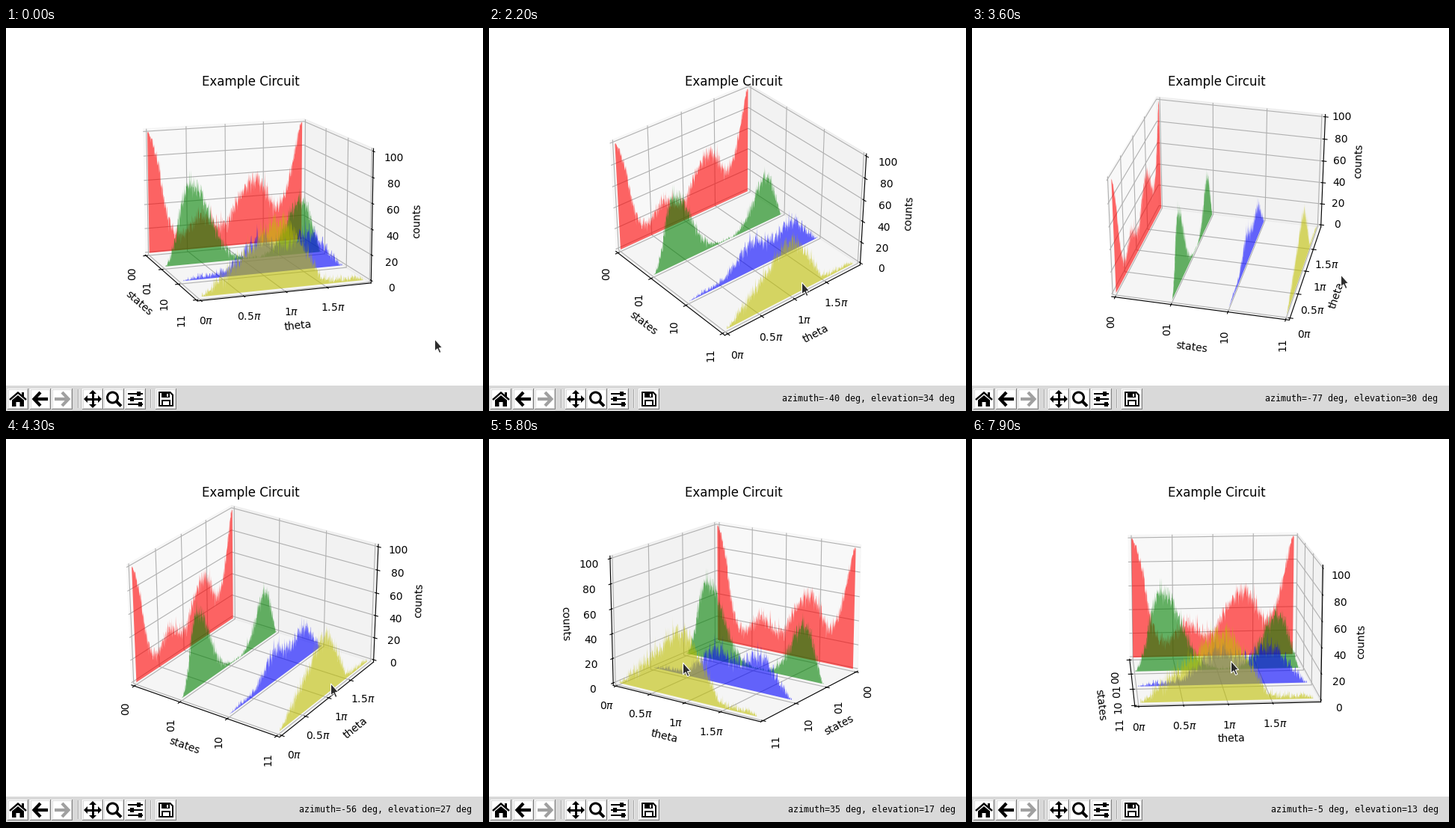
Recreate the animation shown at these times as a matplotlib script. Size 638 by 512 pixels, loop 8000 ms.

```python
import numpy as np
import matplotlib.pyplot as plt
from matplotlib.animation import FuncAnimation
from matplotlib.collections import PolyCollection
from matplotlib.patches import Circle, Polygon, Rectangle

W, H, DPI = 638, 512, 100
FRAMES, INTERVAL = 80, 100
PX = 72 / DPI
DRAG_START = 12


def smooth(t, xs, ys):
    """Monotone cubic interpolation: flat at peaks and over holds."""
    xs, ys = np.asarray(xs, float), np.asarray(ys, float)
    h = np.diff(xs)
    d = np.diff(ys) / h
    a, b = d[:-1], d[1:]
    m = np.zeros_like(ys)
    m[1:-1] = [2 * p * q / (p + q) if p * q > 0 else 0 for p, q in zip(a, b)]
    t = np.clip(t, xs[0], xs[-1])
    k = np.clip(np.searchsorted(xs, t, "right") - 1, 0, len(xs) - 2)
    u = (t - xs[k]) / h[k]
    return ((1 + 2 * u) * (1 - u) ** 2 * ys[k] + u * (1 - u) ** 2 * h[k] * m[k]
            + u * u * (3 - 2 * u) * ys[k + 1] + u * u * (u - 1) * h[k] * m[k + 1])


# Mean counts of each state at every 0.1 pi
MEANS = {
    "00": [100, 79, 42, 18, 13, 18, 25, 28, 23, 18, 21,
           32, 45, 53, 55, 47, 34, 30, 46, 75, 100],
    "01": [0, 14, 43, 62, 62, 49, 33, 18, 8, 3, 1,
           0.6, 1, 4, 10, 22, 36, 46, 40, 18, 0],
    "10": [0, 1, 2, 2.5, 3, 5, 9, 15, 22, 27, 27,
           24, 21, 22, 26, 30, 29, 23, 13, 5, 0],
    "11": [0, 4, 10, 15, 22, 29, 36, 42, 48, 52, 51,
           46, 34, 24, 11, 4, 2.5, 3, 3, 2, 0],
}
COLORS = ["r", "g", "b", "y"]

# frame, azimuth, elevation
VIEW = np.array([
    (0, -20, 13), (12, -20, 13), (16, -27, 18), (20, -38, 27), (22, -39.6, 34),
    (23, -40.5, 35), (26, -50, 36), (29, -63, 35), (30, -67, 34.5),
    (33, -75, 32), (37, -77, 30), (39, -77, 30), (42, -64, 27.2),
    (43, -56, 27), (44, -48, 28.6), (51, -2, 28), (52, 6, 27.4),
    (56, 30, 20), (64, 43, 10), (67, 43, 10), (71, 31, 9),
    (75, 9, 10), (79, -5, 13), (80, -5.3, 13.8),
])


def view(i):
    return (smooth(i, VIEW[:, 0], VIEW[:, 1]),
            smooth(i, VIEW[:, 0], VIEW[:, 2]))


def mouse_for(azim, elev):
    """Pointer position that drags the plot to this view."""
    deg_per_px = 180 / 369.6
    return np.array([247 + (43 - azim) / deg_per_px,
                     288 + (elev - 10) / deg_per_px])


def pointer(i):
    if i == 0:
        return np.array([573, 415])
    start = np.array([567, 415])
    if i < 8:
        u = max(0, i - 2) / 6
        u = u * u * (3 - 2 * u)
        return start + u * (mouse_for(-20, 13) - start)
    return mouse_for(*view(i + 1))


def status(i):
    if i < 5:
        return ""
    if i < DRAG_START:
        return f"x=, y=, z={(415 - pointer(i)[1]) * 0.2:.1f}"
    azim, elev = (int(round(float(v))) for v in view(i))
    return f"azimuth={azim} deg, elevation={elev} deg"


fig = plt.figure(figsize=(W / DPI, H / DPI), dpi=DPI, facecolor="white")

# 3D plot
ax = fig.add_axes([79 / W, 86.8 / H, 496 / W, 369.6 / H], projection="3d")
theta = np.arange(0, 2 * np.pi, 0.01)
means = np.array([smooth(theta, np.linspace(0, 2 * np.pi, 21), m)
                  for m in MEANS.values()])
probs = (means / means.sum(axis=0)).T
rng = np.random.default_rng(4)
counts = np.array([rng.multinomial(100, p) for p in probs]).T
verts = [[(theta[0], 0), *zip(theta, c), (theta[-1], 0)] for c in counts]
polys = PolyCollection(verts, facecolors=COLORS, linewidths=0, alpha=0.6)
ax.add_collection3d(polys, zs=range(4), zdir="x")

ax.set_xticks(range(4), list(MEANS), rotation=90)
ax.set_yticks(np.arange(4) * np.pi / 2,
              [rf"{n}$\pi$" for n in ("0", "0.5", "1", "1.5")])
ax.set_zticks(range(0, 101, 20))
for set_lim, top in ((ax.set_xlim, 3), (ax.set_ylim, 2 * np.pi), (ax.set_zlim, 100)):
    set_lim(-top / 48, top * 49 / 48)
ax.set_xlabel("states")
ax.set_ylabel("theta")
ax.set_zlabel("counts")
ax.set_title("Example Circuit", y=1)

# Overlay in pixels, y downwards
ov = fig.add_axes([0, 0, 1, 1], zorder=5)
ov.set(xlim=(0, W), ylim=(H, 0))
ov.axis("off")


def rect(x0, y0, x1, y1, color):
    ov.add_patch(Rectangle((x0, y0), x1 - x0, y1 - y0, fc=color, lw=0))


def shape(points, color="k"):
    ov.add_patch(Polygon(points, fc=color, lw=0))


def stroke(points, width, color="k"):
    ov.plot(*zip(*points), color=color, lw=width * PX,
            solid_capstyle="butt", solid_joinstyle="miter")


def button(cx):
    rect(cx - 14, 482, cx + 14, 510, "#828282")
    rect(cx - 14, 482, cx + 13, 509, "white")
    rect(cx - 13, 483, cx + 13, 509, "#d9d9d9")
    rect(cx - 12, 484, cx + 12, 508, "white")


def arrow(cx, side, color):
    stroke([(cx - side * 0, 487), (cx + side * 8.5, 496), (cx, 505)], 4.2, color)
    stroke([(cx - side * 10, 496), (cx + side * 8, 496)], 4.2, color)


rect(0, 478, W, H, "#d9d9d9")
for cx in (16, 46, 75, 116, 144, 173, 214):
    button(cx)
for x in (97, 194):
    rect(x - 1, 483, x, 508, "#a8a8a8")
    rect(x, 483, x + 1, 508, "#f2f2f2")

# home
stroke([(5, 497), (16, 487.5), (27, 497)], 2.4)
rect(21, 487, 24, 493, "k")
shape([(8, 497.5), (16, 491), (24, 497.5), (24, 506), (18.5, 506),
       (18.5, 500), (13.5, 500), (13.5, 506), (8, 506)])
# back and forward
arrow(46, -1, "k")
arrow(75, 1, "#a0a0a0")
# pan
stroke([(107, 496), (125, 496)], 3)
stroke([(116, 487), (116, 505)], 3)
for dx, dy in ((1, 0), (-1, 0), (0, 1), (0, -1)):
    x, y = 116 + 7 * dx, 496 + 7 * dy
    shape([(x + 5 * dx, y + 5 * dy), (x + 5 * dy, y + 5 * dx),
           (x - 5 * dy, y - 5 * dx)])
# zoom
ov.add_patch(Circle((142.5, 494), 7, fc="none", ec="k", lw=3 * PX))
stroke([(147, 498.5), (154, 505.5)], 4)
# sliders
for y, knob in ((489, 177), (496, 168), (503, 179)):
    stroke([(163, y), (183, y)], 2)
    rect(knob - 2.5, y - 3, knob + 2.5, y + 3, "k")
# save
shape([(204, 486), (220, 486), (224, 490), (224, 506), (204, 506)])
shape([(206, 488), (219, 488), (222, 491), (222, 504), (206, 504)], "white")
rect(208, 487, 219, 494, "k")
rect(214.5, 488.5, 217, 492.5, "white")
rect(208, 497, 220, 505, "k")
rect(210, 499, 218, 504, "white")

label = ov.text(623.5, 499.5, "", family="DejaVu Sans Mono", size=8.37,
                ha="right", va="baseline")
ARROW = np.array([(0.5, 1), (0.5, 17), (4, 13.8), (6.6, 19.5),
                  (9, 18.4), (6.4, 12.8), (10.6, 12.4)])
mouse = Polygon(ARROW, fc="#2d2d2d", ec="white", lw=1 * PX, zorder=9)
ov.add_patch(mouse)


def update(i):
    azim, elev = view(i)
    ax.view_init(elev=float(elev), azim=float(azim))
    mouse.set_xy(ARROW + np.round(pointer(i)))
    label.set_text(status(i))
    return []


anim = FuncAnimation(fig, update, frames=FRAMES, interval=INTERVAL,
                     repeat=True, repeat_delay=0, blit=False)
plt.show()
```
